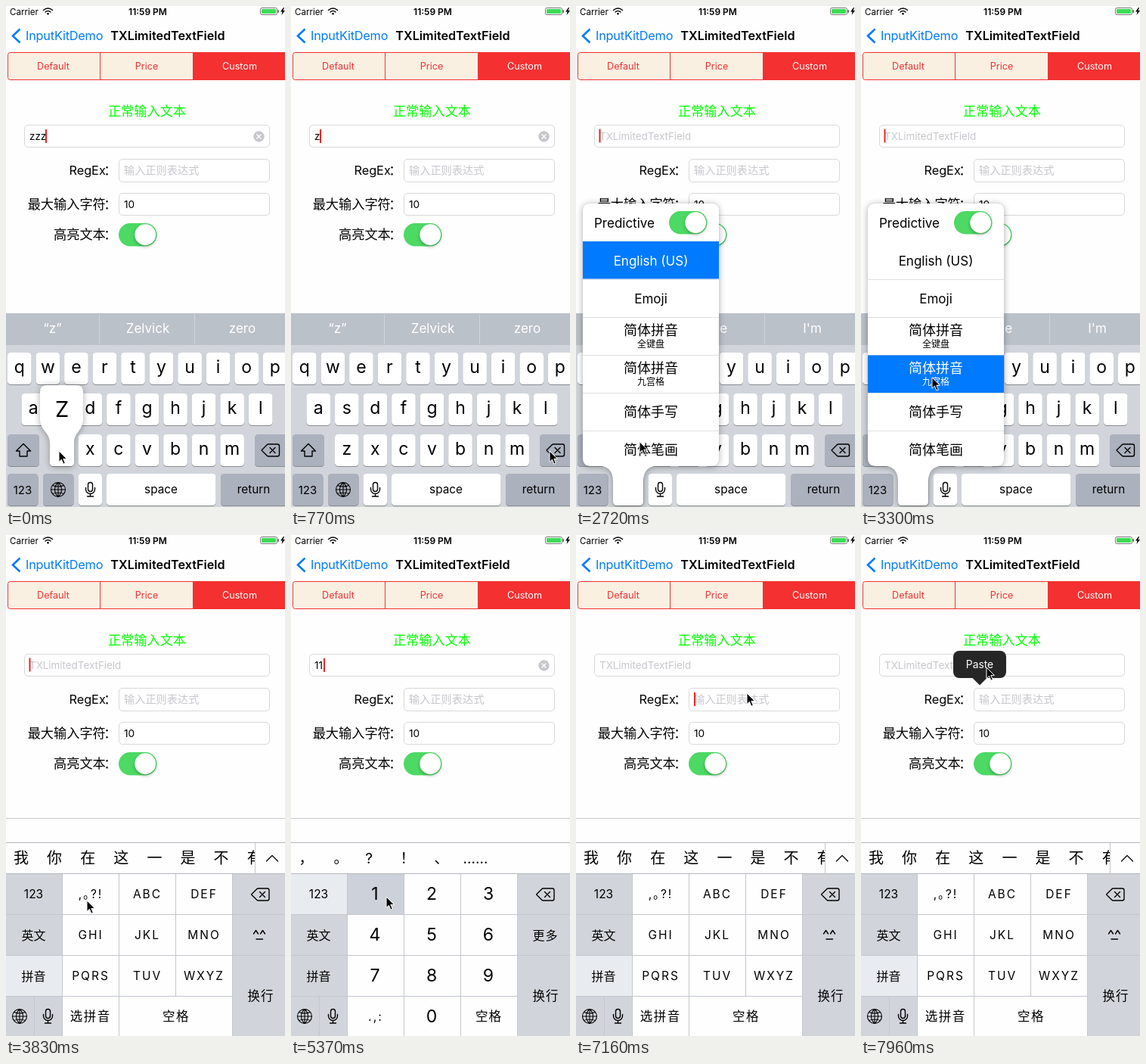
Write an HTML page that moves like this. It is 369 px wide and 662 px high and loops after 8000 ms.

```html
<!DOCTYPE html>
<html lang="en">
<head>
<meta charset="utf-8">
<title>Text field input demo</title>
<style>
html, body { margin: 0; width: 100%; height: 100%; overflow: hidden; background: #fefefe; }
svg { display: block; width: 369px; height: 662px; }
text { font-family: Inter, "Noto Sans CJK SC", "Noto Sans CJK", sans-serif; white-space: pre; }
.line { fill: none; stroke: #000; stroke-width: 1.4; stroke-linecap: round; stroke-linejoin: round; }
.field { fill: #fff; stroke: #d9d9d9; }
.soft { filter: drop-shadow(0 1px 4px #0005); }
#pointer { animation: move 8s linear infinite; }
</style>
</head>
<body>
<script>
const LOOP = 8000;
let css = '', count = 0;

// Shows content only inside the given [from, to] times in ms.
function during(ranges, body) {
  const stops = { 0: 0 };
  for (const [from, to] of ranges) { stops[from] = 1; stops[to] = 0; }
  const name = 'show' + count++;
  css += `@keyframes ${name}{${Object.entries(stops)
    .map(([t, o]) => `${t / LOOP * 100}%{opacity:${o}}`).join('')}}`;
  return `<g style="animation:${name} 8s step-end infinite">${body}</g>`;
}

const text = (x, y, s, size, fill = '#000', extra = '') =>
  `<text x="${x}" y="${y}" font-size="${size}" fill="${fill}" text-anchor="middle" ${extra}>${s}</text>`;
const left = (x, y, s, size, fill, extra = '') =>
  `<text x="${x}" y="${y}" font-size="${size}" fill="${fill}" ${extra}>${s}</text>`;
const rect = (x, y, w, h, fill, r = 0, extra = '') =>
  `<rect x="${x}" y="${y}" width="${w}" height="${h}" rx="${r}" fill="${fill}" ${extra}/>`;
const line = (d, extra = '') => `<path class="line" d="${d}" ${extra}/>`;
const rule = (d, color) => `<path d="${d}" fill="none" stroke="${color}"/>`;
const field = (x, y, w, h) => `<rect class="field" x="${x}" y="${y}" width="${w}" height="${h}" rx="4.5"/>`;
const caret = (x, y) => rect(x, y, 2, 18, '#f02020');

const toggle = (x, y) => rect(x, y, 50.5, 30.5, '#4cd964', 15.25) +
  `<circle cx="${x + 35.2}" cy="${y + 15.25}" r="13.9" fill="#fff" style="filter:drop-shadow(0 2px 2px #0004)"/>`;
const globe = (x, y) => `<g transform="translate(${x} ${y})">` +
  line('M-9.5 0a9.5 9.5 0 1 0 19 0a9.5 9.5 0 1 0-19 0H9.5M0-9.5V9.5M0-9.5C-6-4-6 4 0 9.5C6 4 6-4 0-9.5M-7.5-5.5Q0-2.5 7.5-5.5M-7.5 5.5Q0 2.5 7.5 5.5', 'style="stroke-width:1.1"') + '</g>';
const mic = (x, y) => `<g transform="translate(${x} ${y})">` +
  line('M-3-6a3 3 0 0 1 6 0V0a3 3 0 0 1-6 0ZM-6-2V0a6 6 0 0 0 12 0V-2M0 6V9.5M-4 9.5H4') + '</g>';
const backspace = (x, y) => `<g transform="translate(${x} ${y})">` +
  line('M-12 0L-5-7Q-4-8-3-8H9Q11.5-8 11.5-5.5V5.5Q11.5 8 9 8H-3Q-4 8-5 7ZM-1-3.5L6 3.5M6-3.5L-1 3.5') + '</g>';

function page() {
  const tabs = rect(2.5, 61.5, 370, 36, '#f9f0e2', 3) + rect(247, 61.5, 126, 36, '#f53030') +
    rule('M372 61.5H5.5q-3 0-3 3v30q0 3 3 3H372M124.5 62v35M247.5 62v35', '#f33030') +
    text(62.5, 84, 'Default', 12.6, '#f33030') + text(186, 84, 'Price', 12.6, '#f33030') +
    text(309, 84, 'Custom', 12.6, '#fff');
  const status = left(5, 11.5, 'Carrier', 11.6, '#000') +
    line('M49.5 5.5q6-5 12 0M52 8q3.5-3 7 0') + '<circle cx="55.5" cy="10.3" r="1.3"/>' +
    text(187.5, 11.5, '11:59 PM', 12, '#000', 'font-weight="600"') +
    rect(336.5, 2.5, 22, 9, '#fff', 2, 'stroke="#555" stroke-width=".8"') + rect(338, 4, 19, 6, '#3ddc55', 1) +
    rect(359.5, 5, 1.5, 4, '#555', .7) + '<path d="M367 2l-4 5.5h2.5l-1 4.5 4.5-6h-2.5l1.5-4z"/>';
  const nav = '<path d="M18.5 30.5L9 39.5L18.5 48.5" fill="none" stroke="#007aff" stroke-width="2.6"/>' +
    left(26, 45, 'InputKitDemo', 16.3, '#007aff', 'letter-spacing="-.2"') +
    text(214, 45, 'TXLimitedTextField', 16.2, '#000', 'font-weight="600"');
  const label = (y, s) => text(146.5, y, s + '<tspan dx="-2.5">：</tspan>', 17.2, '#000', 'style="text-anchor:end"');
  const form = text(186.5, 145, '正常输入文本', 17.2, '#0f0') +
    field(24.5, 157.5, 324, 29) + field(149.5, 202.5, 199, 30) + field(149.5, 247.5, 199, 29) +
    label(223, '<tspan font-size="16.3">RegEx</tspan>') + label(268, '最大输入字符') + label(308, '高亮文本') +
    left(156, 222, '输入正则表达式', 14.2, '#c7c7cd') + left(156, 267, '10', 13.6, '#000') + toggle(149, 287);
  return status + nav + tabs + form;
}

function typedText() {
  const states = [
    ['zzz', 0, 560], ['zz', 560, 720], ['z', 720, 880], ['1', 5080, 5330], ['11', 5330, 5600],
    ['111', 5600, 6030], ['11', 6030, 6150], ['1', 6150, 6270]
  ];
  const typed = states.map(([s, from, to]) => during([[from, to]],
    left(31, 177, s, 13.4, '#000') + caret(31 + s.length * (s[0] === 'z' ? 7 : 6), 163)));
  const clear = during([[0, 880], [5080, 6270]],
    '<circle cx="334.5" cy="172.5" r="7.2" fill="#c7c7cc"/>' +
    '<path d="M331.5 169.5l6 6m0-6l-6 6" stroke="#fff" stroke-width="1.4"/>');
  const hint = during([[880, 5080], [6270, LOOP]], left(31, 177, 'TXLimitedTextField', 13.4, '#c7c7cd'));
  const blink = during([[880, 1100], [1380, 1640], [1880, 4250], [4600, 4800], [4880, 5080],
    [6270, 6500], [6650, 6820]], caret(30.5, 162.5));
  return typed.join('') + clear + hint + blink + during([[7100, 7700]], caret(156, 208));
}

function letterKeyboard() {
  const key = (x, y, w, fill = '#fff') => rect(x, y + 1, w, 42, '#898c91', 4.5) + rect(x, y, w, 42, fill, 4.5);
  const row = (s, x, y) => [...s].map((c, i) =>
    key(x + i * 37.55, y, 31.6) + text(x + i * 37.55 + 15.8, y + 27, c, 23)).join('');
  const words = list => list.map((s, i) => text([61.5, 187.5, 312.5][i], 432, s, 17, '#fff')).join('');
  const gray = '#abb1bd';
  return rect(0, 406, 369, 256, '#d1d5db') + rect(0, 406, 369, 42, '#bbc1c9') +
    rule('M123.5 407V447M249.5 407V447', '#d0d4da') +
    during([[0, 880]], words(['“z”', 'Zelvick', 'zero'])) +
    during([[880, LOOP]], words(['I', 'the', "I'm"])) +
    row('qwertyuiop', 2, 458) + row('asdfghjkl', 20.5, 512) + row('zxcvbnm', 58, 566) +
    key(2, 566, 42, gray) + line('M23 578.5L13.5 588H18V595H28V588H32.5Z') +
    key(329, 566, 46, gray) + backspace(350, 587) +
    key(2, 618, 40.5, gray) + text(22, 645, '123', 15) +
    key(49, 618, 40.5, gray) + globe(69, 639) + key(95.5, 618, 31.5) + mic(111.5, 638.5) +
    key(133, 618, 144.5) + text(205, 644, 'space', 15.3) + key(284, 618, 92, gray) + text(327.5, 644, 'return', 15.3) +
    during([[0, 60]],
      '<path class="soft" fill="#fff" d="M54 501H93Q102 501 102 510V545C102 562 90 562 90 578V603Q90 608 85 608H63Q58 608 58 603V578C58 562 45 562 45 545V510Q45 501 54 501Z"/>' +
      text(74, 543, 'Z', 29));
}

function gridKeyboard() {
  const colX = [36.5, 111, 186, 261, 336], rowY = [480.5, 534.5, 588.5, 641.5];
  const gray = '#d1d5db', light = '#e8ecf1', edge = '#c4c7ce';
  const put = (col, row, s, size = 16, spacing = 0) =>
    text(colX[col] + spacing / 2, rowY[row], s, size, '#000', `letter-spacing="${spacing}"`);
  const grid = (rows, size, spacing, dy) => `<g transform="translate(0 ${dy})">` + rows.map((r, j) =>
    r.map((s, i) => put(i + 1, j, s, size, spacing)).join('')).join('') + '</g>';
  const numeric = [[4560, 7100]], pinyin = [[0, 4560], [7100, LOOP]];
  const base = rect(0, 374, 369, 288, '#fefefe') + rect(0, 448, 74.5, 214, gray) + rect(299.5, 448, 70, 214, gray);
  const pinyinKeys = during(pinyin, rect(0, 555.5, 74.5, 54, light) +
    grid([[',｡?!', 'ABC', 'DEF'], ['GHI', 'JKL', 'MNO'], ['PQRS', 'TUV', 'WXYZ']], 15.5, 2, -.8) +
    put(1, 3, '选拼音', 16.5, 1.5) + text(225, 641.5, '空格', 16.5, '#000', 'letter-spacing="1.5"') +
    line('M327.5 527l3-4.5 3 4.5M336.5 527l3-4.5 3 4.5M331 534H339.5'));
  const numberKeys = during(numeric, rect(0, 448, 74.5, 53.5, light) +
    during([[5080, 5190], [5330, 5490], [5600, 5690]], rect(75, 448, 74.5, 53.5, '#cdd1d9')) +
    grid([[1, 2, 3], [4, 5, 6], [7, 8, 9]], 23, 0, 1) + put(1, 3, '.,:', 16, 2) + text(186, 643.5, '0', 23) +
    put(3, 3, '空格', 16.5, 1) + put(4, 1, '更多', 16, 1) + rule('M224.5 609V662', edge));
  const shared = text(36.5, 479.8, '123', 15.5) + put(0, 1, '英文', 16) + put(0, 2, '拼音', 16) +
    globe(18, 636) + mic(55.5, 635.5) + backspace(336.5, 475) + text(337, 615, '换行', 16.5, '#000', 'letter-spacing="1"');
  const lines = rule('M0 501.5H369M0 555.5H369M0 609.5H299M74.5 448V662M149.5 448V662M224.5 448V609M299.5 448V662M37.5 610V662', edge) +
    rule('M0 374.5H369', '#cbcbd0') + rule('M0 406.5H369M0 447.5H369', '#b4b7be');
  const candidates = during([[0, 5080], [6270, LOOP]],
    '<g clip-path="url(#bar)">' + [...'我你在这一是不有'].map((c, i) => text(20 + i * 44.1, 434, c, 20)).join('') + '</g>' +
    rule('M329.5 407V447', '#c4c7ce') + line('M344.5 431l7.5-7.5 7.5 7.5', 'style="stroke-width:1.2"'));
  const marks = during([[5080, 6270]], ['，', '。', '?', '！', '、', '……'].map((c, i) =>
    text([20, 66, 103, 154, 199, 244][i], 434, c, 19)).join(''));
  return base + pinyinKeys + numberKeys + lines + shared + candidates + marks;
}

function languageMenu() {
  const hot = y => rect(9, y, 180, 49.5, '#007aff');
  const row = (y, s, fill, sub) => text(99, sub ? y + 24 : y + 32, s, s > '~' ? 18 : 17, fill) +
    (sub ? text(99, y + 40, sub, 12, fill) : '');
  const choices = (english, pinyin) => row(311, 'English (US)', english) + row(461, '简体拼音', pinyin, '九宫格');
  return '<path class="soft" fill="#fff" d="M19 261H179Q189 261 189 271V597Q189 608 178 608H107C95 608 89 615 89 628V655Q89 660 84 660H54Q49 660 49 655V628C49 615 43 608 31 608H20Q9 608 9 597V271Q9 261 19 261Z"/>' +
    left(24, 293, 'Predictive', 17, '#000') + toggle(123, 271) +
    rule('M9 361.5H189M9 411.5H189M9 461.5H189M9 511.5H189M9 561.5H189', '#e0e0e2') +
    row(361, 'Emoji', '#000') + row(411, '简体拼音', '#000', '全键盘') +
    row(511, '简体手写', '#000') + row(561, '简体笔画', '#000') +
    during([[0, 3200]], hot(311) + choices('#fff', '#000')) +
    during([[3200, LOOP]], hot(461.5) + choices('#000', '#fff'));
}

const pasteBubble = rect(122, 153, 70, 36, '#262626', 8) +
  '<path d="M147 188.5H167L157 198.5Z" fill="#262626"/>' + text(157, 176, 'Paste', 13.8, '#fff');

const pointer = '<path id="pointer" d="M0 0V14.5L3.4 11.3L5.9 17.2L8.3 16.2L5.8 10.4H10.4Z" stroke="#fff"/>';

// Pointer stops: time in ms, x, y.
const path = [
  [0, 70, 588], [60, 70, 588], [480, 342, 588], [900, 342, 588], [1460, 265, 600], [1640, 215, 622],
  [1920, 69, 638], [2540, 69, 638], [2720, 84, 576], [3100, 92, 492], [3420, 95, 490], [3830, 107, 483],
  [4180, 107, 483], [4480, 38, 478], [4640, 38, 478], [4900, 126, 478], [5700, 126, 478], [5990, 335, 473],
  [6370, 335, 473], [6710, 230, 231], [6770, 230, 231], [6880, 226, 209], [7400, 226, 209],
  [7900, 166, 175], [8000, 166, 175]
];
css += `@keyframes move{${path.map(([t, x, y]) =>
  `${t / LOOP * 100}%{transform:translate(${x}px,${y}px)}`).join('')}}`;

const scene = page() + typedText() +
  during([[0, 3480]], letterKeyboard()) +
  during([[3480, LOOP]], gridKeyboard()) +
  during([[2190, 3480]], languageMenu()) +
  during([[7460, LOOP]], pasteBubble) + pointer;

document.body.innerHTML = `<style>${css}</style>
  <svg viewBox="0 0 369 662"><defs><clipPath id="bar"><rect x="0" y="407" width="329" height="40"/></clipPath></defs>${scene}</svg>`;
</script>
</body>
</html>
```
